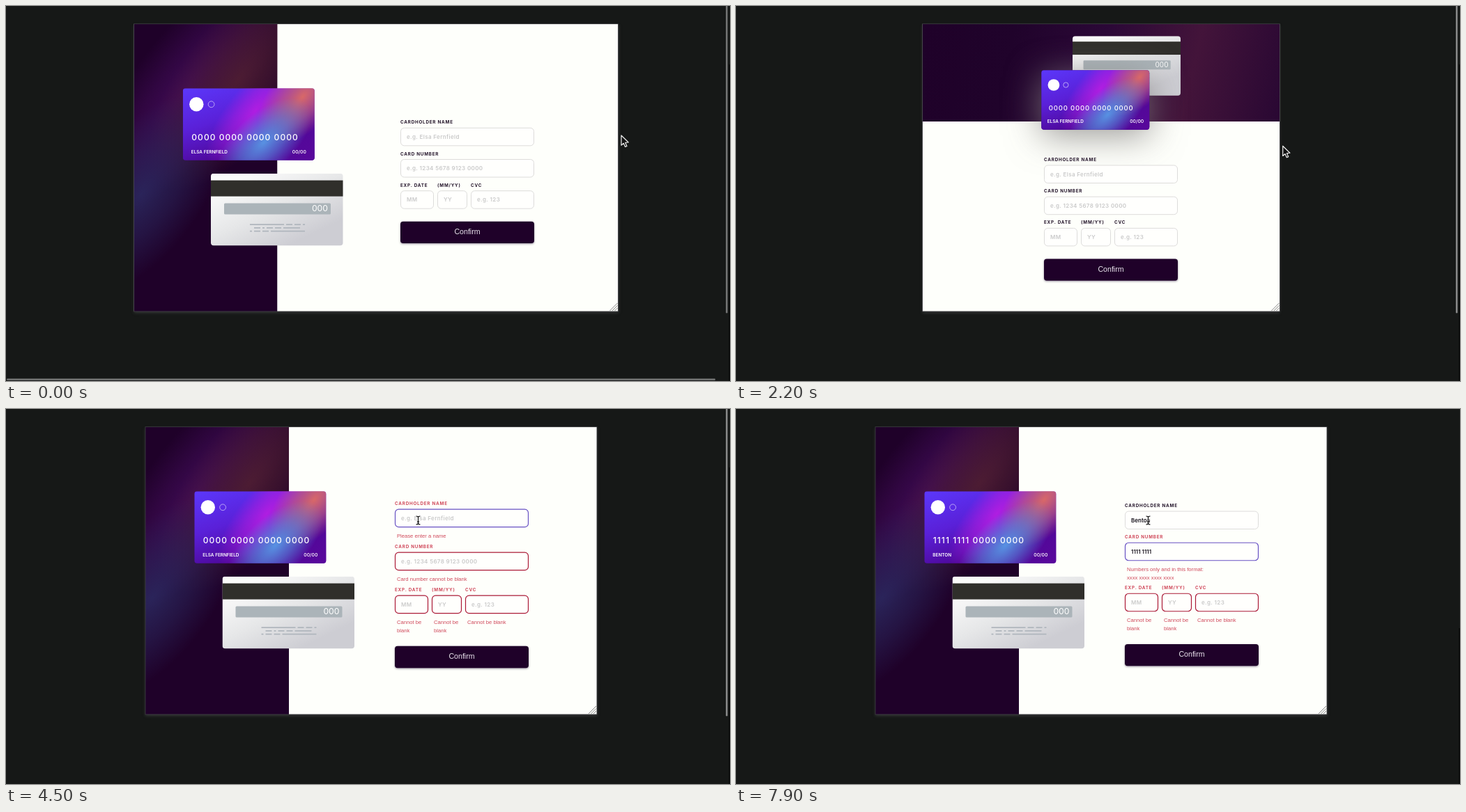
These frames come from a looping animation (1039x539 px, 8 s). An HTML page with a canvas:

```html
<!DOCTYPE html>
<html lang="en">
<head>
<meta charset="utf-8">
<title>Card form</title>
<style>
html, body { margin: 0; width: 100%; height: 100%; overflow: hidden; background: #161817; }
canvas { display: block; width: 1039px; height: 539px; }
</style>
</head>
<body>
<canvas id="stage"></canvas>
<script>
const W = 1039, H = 539, LOOP = 8000, STEP = 100;
const TOP = 26, BOTTOM = 439, FORM_W = 192;
const SANS = '"Liberation Sans", Arial, sans-serif';
const GROTESK = 'Inter, "Open Sans", sans-serif';
const HOLDER = 'Elsa Fernfield', TYPED = 'Benton';
const DARK = '#1f0129', RED = '#d04a5c', LINE_RED = '#ab1a37', FOCUS = '#6751c4';
const SUBMIT = 3800;

const canvas = document.getElementById('stage');
const ctx = canvas.getContext('2d');
const dpr = window.devicePixelRatio || 1;
canvas.width = W * dpr;
canvas.height = H * dpr;

const ramp = (t, a, b) => Math.min(1, Math.max(0, (t - a) / (b - a)));
const easeOut = (t, a, b, p = 2.15) => 1 - (1 - ramp(t, a, b)) ** p;
const easeBoth = (t, a, b) => { const k = ramp(t, a, b); return k * k * (3 - 2 * k); };
const groups = s => s.replace(/(.{4})(?=.)/g, '$1 ');
// Keys pressed so far in a burst that starts at a given time
const burst = (t, start, count, gap) =>
  t < start ? 0 : Math.min(count, 1 + Math.floor((t - start) / gap));

const panelWidth = t => 695 - 410 * easeBoth(t, 1000, 1500) + 363 * easeOut(t, 1850, 2800);

function pointerAt(t) {
  let x = 883, y = 186;
  const move = (nx, ny, k) => { x += (nx - x) * k; y += (ny - y) * k; };
  move(882, 185, ramp(t, 100, 200));
  move(870, 179, ramp(t, 300, 500));
  move(673, 200, easeBoth(t, 1000, 1500));
  move(851, 202, easeOut(t, 1850, 2800));
  move(697, 327, easeOut(t, 2850, 3700, 3));
  move(591.5, 160, easeBoth(t, SUBMIT, 4300));
  return [x, y];
}

function rect(x, y, w, h, fill) {
  ctx.fillStyle = fill;
  ctx.fillRect(x, y, w, h);
}
function round(x, y, w, h, r, fill) {
  ctx.beginPath();
  ctx.roundRect(x, y, w, h, r);
  if (fill) {
    ctx.fillStyle = fill;
    ctx.fill();
  }
}
function disc(x, y, r) {
  ctx.beginPath();
  ctx.arc(x, y, r, 0, Math.PI * 2);
}
function line(x0, y0, x1, y1) {
  ctx.beginPath();
  ctx.moveTo(x0, y0);
  ctx.lineTo(x1, y1);
  ctx.stroke();
}
function text(s, x, cy, size, color, { font = GROTESK, weight = 400, gap = 0, align = 'left' } = {}) {
  ctx.font = `${weight} ${size}px ${font}`;
  ctx.letterSpacing = gap + 'px';
  ctx.textAlign = align;
  ctx.fillStyle = color;
  ctx.fillText(s, x, cy + size * 0.36);
}
function linear(x0, y0, x1, y1, ...stops) {
  const g = ctx.createLinearGradient(x0, y0, x1, y1);
  stops.forEach((c, i) => g.addColorStop(i / (stops.length - 1), c));
  return g;
}
// Soft rotated ellipse of light
function glow(x, y, rx, ry, deg, rgb, alpha = 1) {
  ctx.save();
  ctx.translate(x, y);
  ctx.rotate(deg * Math.PI / 180);
  ctx.scale(rx, ry);
  const g = ctx.createRadialGradient(0, 0, 0, 0, 0, 1);
  g.addColorStop(0, `rgba(${rgb},${alpha})`);
  g.addColorStop(0.5, `rgba(${rgb},${alpha * 0.55})`);
  g.addColorStop(1, `rgba(${rgb},0)`);
  rect(-1, -1, 2, 2, g);
  ctx.restore();
}
function shadowed(color, blur, dy, draw) {
  ctx.save();
  ctx.shadowColor = color;
  ctx.shadowBlur = blur * dpr;
  ctx.shadowOffsetY = dy * dpr;
  draw();
  ctx.restore();
}
// Draws inside a rounded box with the origin at its corner
function inside(x, y, w, h, r, draw) {
  ctx.save();
  round(x, y, w, h, r);
  ctx.clip();
  ctx.translate(x, y);
  draw();
  ctx.restore();
}

function backdrop(x, w, wide) {
  const bw = wide ? 206 : w, bh = wide ? BOTTOM - TOP : 140;
  inside(x, TOP, bw, bh, 0, () => {
    rect(0, 0, bw, bh, wide ? DARK
      : linear(0, 0, bw, bh * 0.8, DARK, '#20032b', '#2b0837', '#43143a', '#2a0833'));
    if (!wide) return;
    glow(75, 95, 230, 78, -53, '68,12,92', 0.85);
    glow(150, 80, 190, 82, -53, '82,32,50', 0.85);
    glow(10, 245, 170, 85, -53, '44,44,100', 0.8);
  });
}

function backCard(x, y, wide) {
  const w = wide ? 189.5 : 155, h = wide ? 103.5 : 85.5, k = w / 189.5;
  inside(x, y, w, h, 4, () => {
    ctx.scale(k, k);
    rect(0, 0, 190, 105, linear(60, 0, 110, 104, '#fafafa', '#e6e7e8', '#cdcdd3'));
    rect(0, 9.8, 190, 23, '#302f2b');
    round(19, 42.8, 153, 16, 1.5, '#abb4b9');
    text('000', 168, 50.2, 12.2, '#fff', { align: 'right' });
    ctx.strokeStyle = '#b0b6bd';
    ctx.lineWidth = 1.7;
    ctx.setLineDash([49, 3, 9, 3, 9, 3, 3, 3]);
    line(56, 73.3, 135, 73.3);
    line(135, 82.8, 56, 82.8);
    ctx.lineDashOffset = 25;
    line(128, 78, 62, 78);
  });
}

function frontCard(x, y, wide, name, number) {
  const w = wide ? 189 : 155, h = wide ? 103.5 : 85.5, k = w / 189;
  if (!wide) shadowed('rgba(132,130,128,.8)', 50, 9, () => round(x, y, w, h, 4, '#400a80'));
  inside(x, y, w, h, 4, () => {
    ctx.scale(k, k);
    rect(0, 0, 190, 105, linear(15, 0, 50, 104, '#5b36f8', '#5a20d8', '#4e0798'));
    glow(190, 104, 95, 60, -45, '90,8,156', 0.95);
    glow(104, 32, 100, 38, -50, '180,30,226', 0.95);
    glow(172, 12, 82, 46, -48, '216,104,104', 1);
    glow(116, 78, 84, 42, -42, '88,146,226', 1);
  });
  const dx = wide ? 19.5 : 17.7, dy = wide ? 23 : 21.3;
  ctx.fillStyle = '#fff';
  disc(x + dx, y + dy, 10.2 * k);
  ctx.fill();
  ctx.strokeStyle = 'rgba(255,255,255,.7)';
  ctx.lineWidth = 0.8;
  disc(x + dx + 21.3 * k, y + dy, 4.4 * k);
  ctx.stroke();
  text(number, x + (wide ? 12.5 : 10.5), y + (wide ? 70.3 : 54.8), wide ? 12 : 9.5, '#fff',
    { weight: 500, gap: wide ? 1.05 : 0.85 });
  const ny = y + (wide ? 91.7 : 73.2);
  text(name.toUpperCase(), x + (wide ? 12 : 8.5), ny, 6.4, '#fff', { weight: 600 });
  text('00/00', x + w - (wide ? 12 : 8), ny, 6.8, '#fff', { weight: 500, align: 'right' });
}

// Vertical positions follow from the visible messages
function layout(x, w, wide, s) {
  const rowHeight = errs => errs.length ? 51 + 11 * errs.length : 45.2;
  const g1 = rowHeight(s.nameErr), g2 = rowHeight(s.numErr);
  const end = s.sent ? 80.7 : 52, total = g1 + g2 + end + 31.5;
  const left = Math.round(wide ? x + 21 + w * 0.52
    : x + (w - FORM_W) / 2 + Math.min(14, (w - 285) / 4));
  const y1 = wide ? 254.25 - total / 2 : 221;
  const y2 = y1 + g1, y3 = y2 + g2;
  const field = (dx, y, fw, hint, err, value = '') => ({ x: left + dx, y: y + 8, w: fw, hint, err, value });
  return {
    left, y1, y2, y3,
    fields: [
      field(0, y1, FORM_W, 'e.g. ' + HOLDER, s.nameErr.length, s.name),
      field(0, y2, FORM_W, 'e.g. 1234 5678 9123 0000', s.numErr.length, s.number),
      field(0, y3, 48, 'MM', s.sent),
      field(53, y3, 43, 'YY', s.sent),
      field(101, y3, 91, 'e.g. 123', s.sent)
    ],
    button: { x: left, y: y3 + end, w: FORM_W, h: 31.3 }
  };
}

function form(L, s) {
  const label = (str, dx, y, err) =>
    text(str, L.left + dx, y - 0.2, 6.3, err ? RED : '#24152b', { weight: 700, gap: 0.77 });
  const note = (str, dx, y, row = 0) =>
    text(str, L.left + dx + 3, y + 46.4 + row * 11.2, 7.65, RED, { font: SANS });
  label('CARDHOLDER NAME', 0, L.y1, s.nameErr.length);
  label('CARD NUMBER', 0, L.y2, s.numErr.length);
  label('EXP. DATE', 0, L.y3, s.sent);
  label('(MM/YY)', 53, L.y3, s.sent);
  label('CVC', 101, L.y3, s.sent);
  s.nameErr.forEach((m, i) => note(m, 0, L.y1, i));
  s.numErr.forEach((m, i) => note(m, 0, L.y2, i));
  if (s.sent) {
    for (const dx of [0, 53]) {
      note('Cannot be', dx, L.y3);
      note('blank', dx, L.y3, 1);
    }
    note('Cannot be blank', 101, L.y3);
  }
  L.fields.forEach((f, i) => {
    const focus = i === s.focus;
    round(f.x + 0.5, f.y, f.w - 1, 25.5, 5, '#fffffd');
    ctx.strokeStyle = focus ? FOCUS : f.err ? LINE_RED : '#dddcdb';
    ctx.lineWidth = focus || f.err ? 1.2 : 1;
    ctx.stroke();
    if (f.value) text(f.value, f.x + 9, f.y + 12.8, 8, '#15101a', { weight: 600 });
    else text(f.hint, f.x + 9, f.y + 12.8, 8, '#cacaca', { weight: 600, gap: 0.35 });
  });
  const b = L.button, mix = (p, q) => Math.round(p + (q - p) * s.hover);
  shadowed('rgba(20,0,40,.45)', 3, 1, () =>
    round(b.x, b.y, b.w, b.h, 4, `rgb(${mix(31, 26)},${mix(1, 99)},${mix(41, 183)})`));
  text('Confirm', b.x + b.w / 2, b.y + 14.6, 10.6, '#ebe6ee', { font: SANS, align: 'center' });
}

const ARROW = new Path2D('M0 0V14.2L3.3 11.3 5.6 16.4 8 15.4 5.8 10.4 10.2 10Z');
const BEAM = new Path2D('M-3 -6Q0 -6 0 -4V4Q0 6 -3 6M3 -6Q0 -6 0 -4M0 4Q0 6 3 6M-1.6 2.2H1.6');
const HAND = new Path2D('M-1.5 9V1Q0 -1.5 1.5 1V5L7 6Q8 6 8 8L6.8 15H0L-4 9Q-3.5 7 -1.5 9Z');

function pointer(x, y, kind) {
  const outline = (path, color, width) => {
    ctx.strokeStyle = color;
    ctx.lineWidth = width;
    ctx.stroke(path);
  };
  ctx.save();
  ctx.translate(x, y);
  ctx.lineJoin = 'round';
  if (kind === 'beam') {
    outline(BEAM, 'rgba(255,255,255,.85)', 2.6);
    outline(BEAM, '#111', 1.2);
  } else {
    const shape = kind === 'hand' ? HAND : ARROW;
    ctx.fillStyle = kind === 'hand' ? '#fff' : '#131313';
    ctx.fill(shape);
    outline(shape, kind === 'hand' ? '#111' : '#eee', 1.2);
  }
  ctx.restore();
}

function panel(x, w, wide) {
  shadowed('rgba(60,62,62,.8)', 4, 2, () => rect(x, TOP, w, BOTTOM - TOP, '#fefffb'));
  backdrop(x, w, wide);
  ctx.strokeStyle = '#3e3d42';
  ctx.lineWidth = 0.8;
  ctx.strokeRect(x, TOP - 0.3, w, BOTTOM - TOP + 0.3);
  ctx.strokeStyle = '#666';
  for (let d = 4; d < 12; d += 3.5) line(x + w - d - 1, BOTTOM - 1, x + w - 1, BOTTOM - d - 1);
}

function scrollbars(t, overflow) {
  const tone = t < 900 ? '#727373' : '#868787';
  if (overflow) round(1, 535.5, 1017, 2.5, 1.2, tone);
  ctx.globalAlpha = 1 - ramp(t, 5300, 5800);
  round(1033, -3, 2.6, 444.5, 1.3, tone);
  ctx.globalAlpha = 1;
  const edge = t < 4800 ? 84 : t < 7000 ? 118 : 315;
  rect(1037.5, edge, 1.5, H - edge, '#050606');
}

function draw(t) {
  const w = panelWidth(t), x = Math.max(183.5, 524 - w / 2), wide = w > 580;
  const letters = burst(t, 4800, 1, 100) + burst(t, 5400, 2, 200) + burst(t, 6100, 3, 100);
  const digits = burst(t, 7000, 2, 200) + burst(t, 7700, 6, 40);
  const sent = t >= SUBMIT, name = TYPED.slice(0, letters), ones = '1'.repeat(digits);
  const state = {
    sent, name,
    number: groups(ones),
    nameErr: sent && !name ? ['Please enter a name'] : [],
    numErr: !sent ? [] : digits ? ['Numbers only and in this format:', 'xxxx xxxx xxxx xxxx']
      : ['Card number cannot be blank'],
    focus: t >= 6500 ? 1 : t >= 4500 ? 0 : -1,
    hover: ramp(t, 3000, 3300) * (1 - ramp(t, SUBMIT, 4100))
  };
  const L = layout(x, w, wide, state);

  ctx.setTransform(dpr, 0, 0, dpr, 0, 0);
  rect(0, 0, W, H, '#161817');
  panel(x, w, wide);
  backCard(wide ? x + 110.5 : L.left + 41, wide ? 240.8 : 43.2, wide);
  frontCard(wide ? x + 70.3 : L.left - 3.8, wide ? 118.3 : 92.2, wide,
    name || HOLDER, groups(ones.padEnd(16, '0')));
  form(L, state);
  scrollbars(t, w > 681);

  const [px, py] = pointerAt(t);
  const over = b => px > b.x && px < b.x + b.w && py > b.y && py < b.y + (b.h || 25.5);
  pointer(px, py, over(L.button) ? 'hand' : L.fields.some(over) ? 'beam' : 'arrow');
}

const start = performance.now();
function tick() {
  const t = (performance.now() - start) % LOOP;
  draw(Math.floor(t / STEP) * STEP);
  requestAnimationFrame(tick);
}
tick();
</script>
</body>
</html>
```
